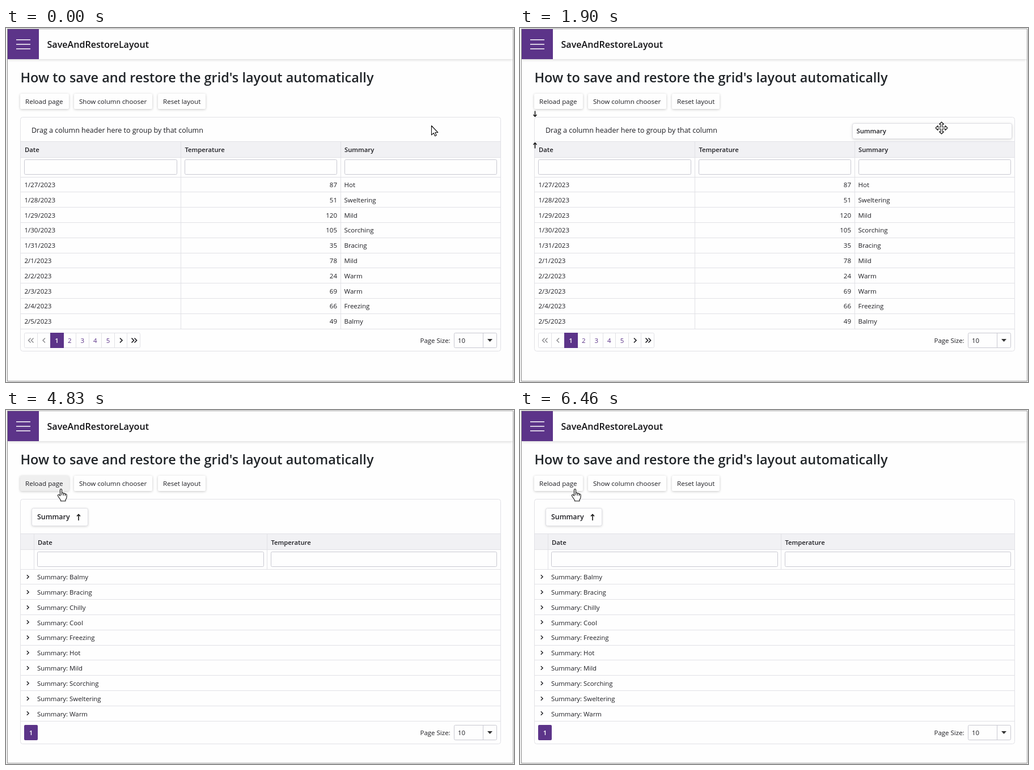
Recreate the animation shown at these times as an HTML page with a canvas. Size 896 by 625 pixels, loop 8000 ms.

```html
<!DOCTYPE html>
<html lang="en">
<head>
<meta charset="utf-8">
<title>Grid layout</title>
<style>
html, body { margin: 0; width: 100%; height: 100%; overflow: hidden; background: #fefefe; }
canvas { display: block; }
</style>
</head>
<body>
<canvas id="stage" width="896" height="625"></canvas>
<script>
const ctx = document.getElementById('stage').getContext('2d');
const LOOP = 8000;
const FAMILY = '"Open Sans", "Noto Sans", sans-serif';
const PURPLE = '#5c3489', INK = '#1d1d22', LINE = '#e1e1e6', FIELD = '#c8c8d1', PAGE = '#fefefe';

const DAYS = ['1/27', '1/28', '1/29', '1/30', '1/31', '2/1', '2/2', '2/3', '2/4', '2/5'];
const TEMPS = [87, 51, 120, 105, 35, 78, 24, 69, 66, 49];
const MOODS = 'Hot Sweltering Mild Scorching Bracing Mild Warm Warm Freezing Balmy'.split(' ');
const GROUPS = 'Balmy Bracing Chilly Cool Freezing Hot Mild Scorching Sweltering Warm'.split(' ');

// Pointer hotspot: time, x, y
const TRACK = [
  [0, 750, 172], [500, 750, 172], [900, 747, 209], [1300, 747, 209], [1900, 743, 176],
  [3060, 743, 176], [3400, 658, 178], [3760, 521, 180], [3900, 459, 180],
  [4150, 325, 175], [4430, 182, 157], [4730, 97, 139], [LOOP, 97, 139]
];

const ARROW = new Path2D('M0 0V16.4L3.8 12.9L6.2 18.2L8.7 17.1L6.4 12H11.3Z');
const HAND = new Path2D('M-2 1.5Q-2 0 -.5 0Q1 0 1 1.5V7Q3.8 5.8 4 8Q6.6 7 7 9Q9.6 8.4 9.6 10.6V14' +
  'Q9.6 17 7.5 19V21.3H-1V19.5Q-3 17 -5.5 13Q-7 10.5 -5 10Q-3.6 9.8 -2 12Z');
const KNUCKLES = new Path2D('M-2 12V1.5M1 7V11M4 8V11.5M7 9V12');

const clamp = (v, a = 0, b = 1) => Math.min(b, Math.max(a, v));

function text(s, x, mid, size = 11.5, { weight = 400, color = INK, align = 'left' } = {}) {
  ctx.font = `${weight} ${size}px ${FAMILY}`;
  ctx.fillStyle = color;
  ctx.textAlign = align;
  ctx.fillText(s, x, Math.round(mid + size * 0.36));
}

function rect(x, y, w, h, color) {
  ctx.fillStyle = color;
  ctx.fillRect(x, y, w, h);
}
const hline = (x, y, w, color = LINE) => rect(x, y, w, 1, color);
const vline = (x, y, h, color = LINE) => rect(x, y, 1, h, color);

function box(x, y, w, h, { fill, stroke, r = 2, blur = 0, shade = 'rgba(0,0,0,.18)' }) {
  ctx.save();
  ctx.beginPath();
  const d = stroke ? 0.5 : 0;
  ctx.roundRect(x + d, y + d, w - 2 * d, h - 2 * d, r);
  if (blur) {
    ctx.shadowColor = shade;
    ctx.shadowBlur = blur;
    ctx.shadowOffsetY = 1;
  }
  if (fill) { ctx.fillStyle = fill; ctx.fill(); }
  ctx.shadowColor = 'transparent';
  if (stroke) { ctx.strokeStyle = stroke; ctx.lineWidth = 1; ctx.stroke(); }
  ctx.restore();
}
const field = (x, y, w) => box(x, y, w, 27, { fill: PAGE, stroke: FIELD });

function polyline(points, color, width) {
  ctx.beginPath();
  points.forEach(([x, y]) => ctx.lineTo(x, y));
  ctx.strokeStyle = color;
  ctx.lineWidth = width;
  ctx.stroke();
}

function chevron(x, y, dir, color, s = 4, width = 1.4) {
  const dx = dir * s / 2;
  polyline([[x - dx, y - s], [x + dx, y], [x - dx, y + s]], color, width);
}

// Vertical arrow, tip at (x, y); dir 1 points down
function stemArrow(x, y, dir, len) {
  polyline([[x, y], [x, y - dir * len]], '#161616', 1.6);
  polyline([[x - 3, y - dir * 3.5], [x, y - dir * 0.5], [x + 3, y - dir * 3.5]], '#161616', 1.6);
}

function pointerAt(t) {
  let i = 0;
  while (i < TRACK.length - 2 && t >= TRACK[i + 1][0]) i++;
  const a = TRACK[i], b = TRACK[i + 1], span = b[0] - a[0], u = (t - a[0]) / span;
  const still = (p, q) => p[1] === q[1] && p[2] === q[2];
  const slope = (k, c) => {
    const p = TRACK[k - 1], m = TRACK[k], n = TRACK[k + 1];
    return !p || !n || still(p, m) || still(m, n) ? 0 : (n[c] - p[c]) / (n[0] - p[0]);
  };
  const axis = c => {
    const v = 1 - u;
    return a[c] * v * v * (1 + 2 * u) + b[c] * u * u * (3 - 2 * u) +
      span * u * v * (v * slope(i, c) - u * slope(i + 1, c));
  };
  return [Math.round(axis(1)), Math.round(axis(2))];
}

function drawHeader() {
  ctx.save();
  ctx.shadowColor = 'rgba(0,0,0,.17)';
  ctx.shadowBlur = 5;
  ctx.shadowOffsetY = 1;
  rect(3, 2, 891, 53, PAGE);
  ctx.restore();
  rect(3, 2, 55, 53, PURPLE);
  for (const y of [20, 28, 36]) rect(18, y, 25, 1.5, '#fff');
  text('SaveAndRestoreLayout', 72.5, 29, 16.1, { weight: 600, color: '#111114' });
}

function drawTop(hover) {
  text("How to save and restore the grid's layout automatically", 25.5, 88, 23.48, { weight: 600, color: '#212529' });
  const button = (s, x, w, fill = PAGE) => {
    box(x, 116, w, 27, { fill, blur: 4, shade: 'rgba(0,0,0,.22)' });
    text(s, x + 9, 130, 11.6);
  };
  button('Reload page', 25, 86, hover);
  button('Show column chooser', 120, 138);
  button('Reset layout', 268, 84);
}

function drawFrame(top, bottom) {
  box(25, 157, 848, bottom - 157, { fill: PAGE, stroke: LINE, r: 4 });
  rect(26, top, 846, 28, '#f1f1f4');
  for (const y of [top - 1, top + 27, top + 62]) hline(26, y, 846);
}

const rowLine = (top, i) => Math.floor(top + 62.2 + 26.78 * i);

function pageSize(mid) {
  text('Page Size:', 730.5, mid);
  box(790, mid - 14, 76, 27, { fill: PAGE, stroke: FIELD });
  vline(841, mid - 13, 25, FIELD);
  text('10', 797, mid);
  ctx.beginPath();
  ctx.moveTo(849, mid - 3);
  ctx.lineTo(858, mid - 3);
  ctx.lineTo(853.5, mid + 2);
  ctx.fillStyle = '#333';
  ctx.fill();
}

const head = (s, x, mid) => text(s, x, mid, 11.25, { weight: 600 });

function drawFlat() {
  drawFrame(201, 571);
  text('Drag a column header here to group by that column', 45, 180, 12.5);
  head('Date', 33, 215);
  head('Temperature', 315.5, 215);
  head('Summary', 597, 215);
  field(32, 232, 270);
  field(315, 232, 269);
  field(597, 232, 269);
  for (const x of [308, 590]) vline(x, 201, 330);
  DAYS.forEach((day, i) => {
    const mid = 277 + 26.78 * i;
    hline(26, rowLine(201, i + 1), 846);
    text(day + '/2023', 32.5, mid);
    text(TEMPS[i], 584, mid, 11.5, { align: 'right' });
    text(MOODS[i], 596.5, mid);
  });

  box(32, 538, 205, 27, { fill: PAGE, stroke: LINE });
  for (const x of [55, 123, 146, 168, 191, 213]) vline(x, 538, 27);
  rect(78, 538, 24, 27, PURPLE);
  for (let n = 1; n <= 5; n++) {
    const on = n === 1;
    text(n, 67 + 22.6 * n, 552, 11.5, { align: 'center', weight: on ? 600 : 400, color: on ? '#fff' : PURPLE });
  }
  chevron(41.5, 551.5, -1, '#88888c');
  chevron(46.5, 551.5, -1, '#88888c');
  chevron(67, 551.5, -1, '#88888c');
  chevron(203, 551.5, 1, INK, 4, 1.7);
  chevron(223.5, 551.5, 1, INK, 4, 1.7);
  chevron(228.5, 551.5, 1, INK, 4, 1.7);
  pageSize(552);
}

function drawGrouped() {
  drawFrame(219, 590);
  box(45, 173, 100, 32, { fill: PAGE, stroke: '#dfdfe4', r: 3, blur: 4 });
  text('Summary', 55, 189, 12.4, { weight: 600 });
  stemArrow(128, 184, -1, 11);
  head('Date', 56, 234);
  head('Temperature', 467.5, 234);
  field(55, 250, 400);
  field(467, 250, 399);
  for (const x of [49, 460]) vline(x, 219, 62);
  GROUPS.forEach((name, i) => {
    const mid = 295 + 26.83 * i;
    hline(26, rowLine(219, i + 1), 846);
    chevron(38.5, Math.round(mid) - 0.5, 1, INK, 3.3);
    text('Summary: ' + name, 55, mid, 11.38);
  });
  box(32, 556, 24, 27, { fill: PURPLE });
  text('1', 44, 570, 11.5, { align: 'center', weight: 600, color: '#fff' });
  pageSize(570);
}

function drawDrag(x, y) {
  if (y < 201) {
    stemArrow(26.5, 156.5, 1, 10);
    stemArrow(26.5, 202.5, -1, 10);
  }
  box(x - 157, y - 8, 282, 28, { fill: PAGE, stroke: '#dfdfe4', r: 3, blur: 5 });
  head('Summary', x - 149.5, y + 6);
}

function ink(path) {
  ctx.fillStyle = '#fff';
  ctx.strokeStyle = '#111';
  ctx.lineWidth = 1.1;
  ctx.lineJoin = 'round';
  ctx.fill(path);
  ctx.stroke(path);
  ctx.lineJoin = 'miter';
}

function movePath() {
  const p = new Path2D();
  for (let k = 0; k < 4; k++) {
    const c = Math.cos(k * Math.PI / 2), s = Math.sin(k * Math.PI / 2);
    for (const [x, y] of [[-1.5, -1.5], [-1.5, -6.5], [-4, -6.5], [0, -10.5], [4, -6.5], [1.5, -6.5]]) {
      p.lineTo(x * c - y * s, x * s + y * c);
    }
  }
  p.closePath();
  return p;
}
const MOVE = movePath();

function drawPointer(t, x, y) {
  const overHead = t < 1330 && y > 200;
  const overButton = t > 4000 && x < 111 && y < 144;
  ctx.save();
  ctx.translate(x + 0.5, y + 0.5);
  if (t >= 1330 && t < 3060) ink(MOVE);
  else if (overHead || overButton) {
    ink(HAND);
    ctx.stroke(KNUCKLES);
  } else ink(ARROW);
  ctx.restore();
}

function hoverColor(t) {
  if (t < 4700 || t >= 6260) return PAGE;
  const v = 254 - 15 * clamp((t - 4700) / 130) - 5 * clamp((t - 6110) / 40);
  return `rgb(${v},${v},${v})`;
}

function draw(t) {
  const [x, y] = pointerAt(t);
  rect(0, 0, 896, 625, PAGE);
  const blank = t >= 6260 && t < 6300;
  const loading = t >= 6260 && t < 6360;
  if (!blank) drawTop(hoverColor(t));
  if (t < 2330) drawFlat();
  else if (!loading) drawGrouped();
  drawHeader();
  rect(0, 0, 2, 625, '#f4f4f4');
  vline(2, 1, 623, '#8e8e8e');
  vline(894, 1, 623, '#9a9a9a');
  hline(2, 1, 893, '#a2a2a2');
  hline(2, 623, 893, '#8e8e8e');
  if (t >= 1330 && t < 2330) drawDrag(x, y);
  drawPointer(t, x, y);
}

const start = performance.now();
function tick() {
  draw((performance.now() - start) % LOOP);
  requestAnimationFrame(tick);
}
tick();
</script>
</body>
</html>
```
